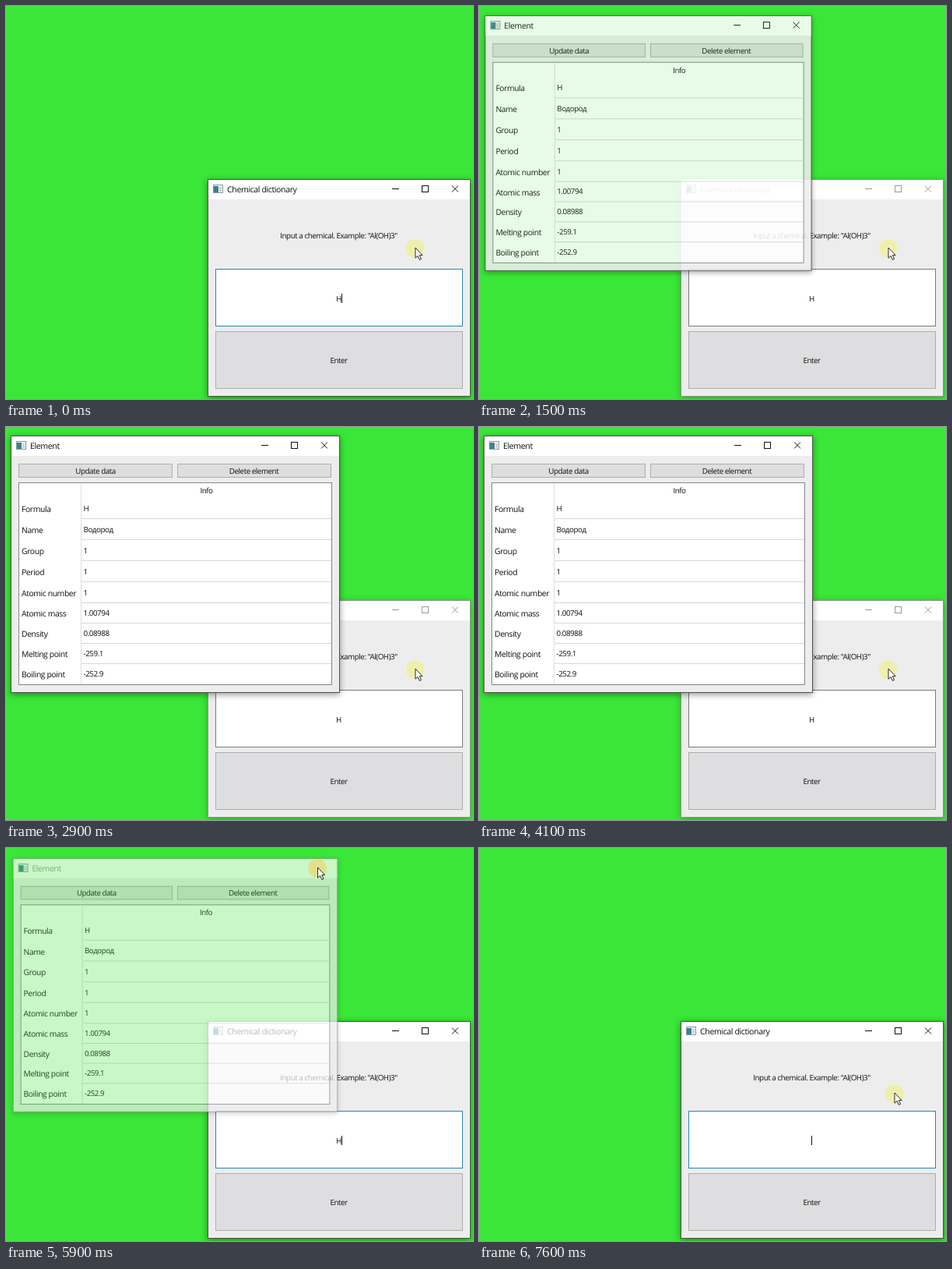
An HTML page for the animation above (7700 ms loop, 600x504 px).

```html
<!DOCTYPE html>
<html lang="en">
<head>
<meta charset="utf-8">
<title>Chemical dictionary</title>
<style>
  html, body { margin: 0; width: 100%; height: 100%; overflow: hidden; background: #3ae637; }
  svg { display: block; width: 600px; height: 504px; }
  text { font-family: "Open Sans", "Noto Sans", sans-serif; fill: #111; text-rendering: geometricPrecision; }
  .title { font-size: 10.6px; letter-spacing: -.4px; }
  .row { font-size: 10.4px; letter-spacing: -.4px; }
  .small { font-size: 9.8px; letter-spacing: -.45px; }
  .mid { text-anchor: middle; }
  .controls { fill: none; stroke: #111; }
  .inactive .controls { stroke: #999; }
  .inactive .title { fill: #999; }
  .frame { fill: #eeedee; stroke: #4b544b; }
  .inactive .frame { stroke: #8b938b; }
  .shadow { opacity: .42; }
  .inactive .shadow { opacity: .25; }
  .button { fill: #dedddf; stroke: #adadad; }
  .field { fill: #fff; stroke: #2386b3; }
  .inactive .field { stroke: #7a7a7a; }
</style>
</head>
<body>
<svg id="stage" viewBox="0 0 600 504">
  <defs>
    <filter id="blur" x="-10%" y="-10%" width="120%" height="120%"><feGaussianBlur stdDeviation="4"/></filter>
  </defs>
  <rect width="600" height="504" fill="#3ae637"/>
  <g id="main"></g>
  <g id="element"></g>
  <g id="pointer">
    <circle id="halo" cy="1" r="12"/>
    <path d="M.5 0V13.2L3.6 10.4L5.8 15.4L8 14.5L5.8 9.6H9.6Z" fill="#fff" stroke="#111" stroke-width=".9"/>
  </g>
</svg>
<script>
const $ = id => document.getElementById(id);

const rect = (x, y, w, h, attrs) => `<rect x="${x}" y="${y}" width="${w}" height="${h}" ${attrs}/>`;
const label = (x, y, cls, content) => `<text x="${x}" y="${y}" class="${cls}">${content}</text>`;
const line = (d, color) => `<path d="${d}" fill="none" stroke="${color}"/>`;

function windowFrame(x, y, w, h, title) {
  const right = x + w;
  return rect(x, y + 2, w, h, 'class="shadow" filter="url(#blur)"') +
    rect(x + .5, y + .5, w - 1, h - 1, 'class="frame"') +
    rect(x + 1, y + 1, w - 2, 25, 'fill="#fff"') +
    rect(x + 7.5, y + 7.5, 12, 10, 'fill="#f3f6f6" stroke="#89999b"') +
    rect(x + 8, y + 9, 6, 8, 'fill="#3c7f91"') +
    rect(x + 15, y + 10, 3, 6, 'fill="#cbd5d5"') +
    label(x + 25, y + 16.6, 'title', title) +
    `<g class="controls"><path d="M${right - 101} ${y + 12.5}h9"/>` +
    rect(right - 62.5, y + 8.5, 8, 8, '') +
    `<path class="cross" d="M${right - 24} ${y + 8.5}l8 8m0 -8l-8 8"/></g>`;
}

function buildMain() {
  return windowFrame(259, 222, 338, 279, 'Chemical dictionary') +
    label(427.5, 298.4, 'small mid', 'Input a chemical. Example: "Al(OH)3"') +
    rect(269.5, 337.5, 317, 73, 'class="field"') +
    `<text id="typed" x="427.5" y="378.6" class="small mid">H</text>` +
    `<path id="caret" stroke="#111" d="M.5 369V381"/>` +
    rect(269.5, 417.5, 317, 73, 'class="button"') +
    label(427.5, 457.6, 'small mid', 'Enter');
}

function buildElement() {
  const rows = [
    ['Formula', 'H'], ['Name', 'Водород'], ['Group', '1'], ['Period', '1'],
    ['Atomic number', '1'], ['Atomic mass', '1.00794'], ['Density', '0.08988'],
    ['Melting point', '-259.1'], ['Boiling point', '-252.9']
  ];
  const bottoms = [117, 144, 171, 198, 225, 251, 277, 303, 329];
  const table = rows.map(([name, value], i) => {
    const y = bottoms[i];
    return label(20, y - 8, 'row', name) + label(99.5, y - 9.2, 'small', value) +
      (i < 8 ? line(`M97 ${y + .5}H418`, '#d8d8d8') : '');
  }).join('');
  return windowFrame(6, 11, 423, 330, 'Element') +
    `<g id="hover">${rect(392, 12, 36, 25, 'fill="#e81123"')}` +
    line('M404 19.5l8 8m0 -8l-8 8', '#fff') + '</g>' +
    rect(16.5, 47.5, 197, 17, 'class="button"') + label(115, 59.8, 'small mid', 'Update data') +
    rect(220.5, 47.5, 197, 17, 'class="button"') + label(318.5, 59.8, 'small mid', 'Delete element') +
    rect(16.5, 71.5, 402, 259, 'fill="#fff" stroke="#828790"') +
    line('M96.5 72V330', '#dedede') +
    label(257.5, 85.2, 'small mid', 'Info') + table;
}

$('main').innerHTML = buildMain();
$('element').innerHTML = buildElement();
const elementControls = $('element').querySelector('.controls');

const LOOP = 7700, STEP = 100;
const OPENED = 1400, CLOSED = 5900, ERASED = 7100;

// time, x, y
const pointerKeys = [
  [0, 525.5, 310], [4300, 525.5, 310], [4900, 397, 46], [5100, 396.5, 41],
  [5500, 401, 26], [5800, 400, 25], [5900, 400, 25], [6100, 390.5, 72],
  [6500, 508, 276], [6900, 533.5, 314], [LOOP, 533.5, 314]
];

function pointerAt(t) {
  const i = pointerKeys.findIndex(key => key[0] > t);
  const [t0, x0, y0] = pointerKeys[i - 1], [t1, x1, y1] = pointerKeys[i];
  const p = (t - t0) / (t1 - t0), e = p * p * (3 - 2 * p);
  return [x0 + (x1 - x0) * e, y0 + (y1 - y0) * e];
}

// opacity and scale of the element window
function elementState(t) {
  if (t < OPENED || t >= CLOSED + 200) return [0, 1];
  if (t < OPENED + 100) return [.4, .96];
  if (t < OPENED + 200) return [.88, .993];
  if (t < CLOSED) return [1, 1];
  return t < CLOSED + 100 ? [.72, .987] : [.2, .96];
}

function caretVisible(t) {
  if (t < OPENED) return t % 1100 < 550;
  if (t < CLOSED) return false;
  return (t - (t < ERASED ? CLOSED : ERASED)) % 1100 < 550;
}

function haloColor(t) {
  if (t >= CLOSED && t < 6000) return 'rgba(244,208,96,.6)';
  return t >= 6000 && t < 6400 ? 'rgba(180,212,170,.5)' : 'rgba(240,240,130,.6)';
}

function render(t) {
  const [opacity, scale] = elementState(t);
  const win = $('element');
  win.setAttribute('opacity', opacity);
  win.setAttribute('transform', `translate(217.5 176) scale(${scale}) translate(-217.5 -176)`);
  win.setAttribute('class', t >= CLOSED ? 'inactive' : '');
  elementControls.setAttribute('opacity', t >= CLOSED ? 0 : 1);
  $('main').setAttribute('class', t >= OPENED && t < CLOSED ? 'inactive' : '');

  const [x, y] = pointerAt(t);
  $('pointer').setAttribute('transform', `translate(${x} ${y})`);
  $('halo').setAttribute('fill', haloColor(t));
  const hovering = t < CLOSED && opacity === 1 && x > 392 && x < 428 && y < 37;
  $('hover').setAttribute('opacity', hovering ? 1 : 0);

  $('typed').setAttribute('opacity', t < ERASED ? 1 : 0);
  $('caret').setAttribute('transform', `translate(${t < ERASED ? 431 : 427} 0)`);
  $('caret').setAttribute('opacity', caretVisible(t) ? 1 : 0);
}

const start = performance.now();
function tick() {
  const t = (performance.now() - start) % LOOP;
  render(Math.floor(t / STEP) * STEP);
  requestAnimationFrame(tick);
}
tick();
</script>
</body>
</html>
```
